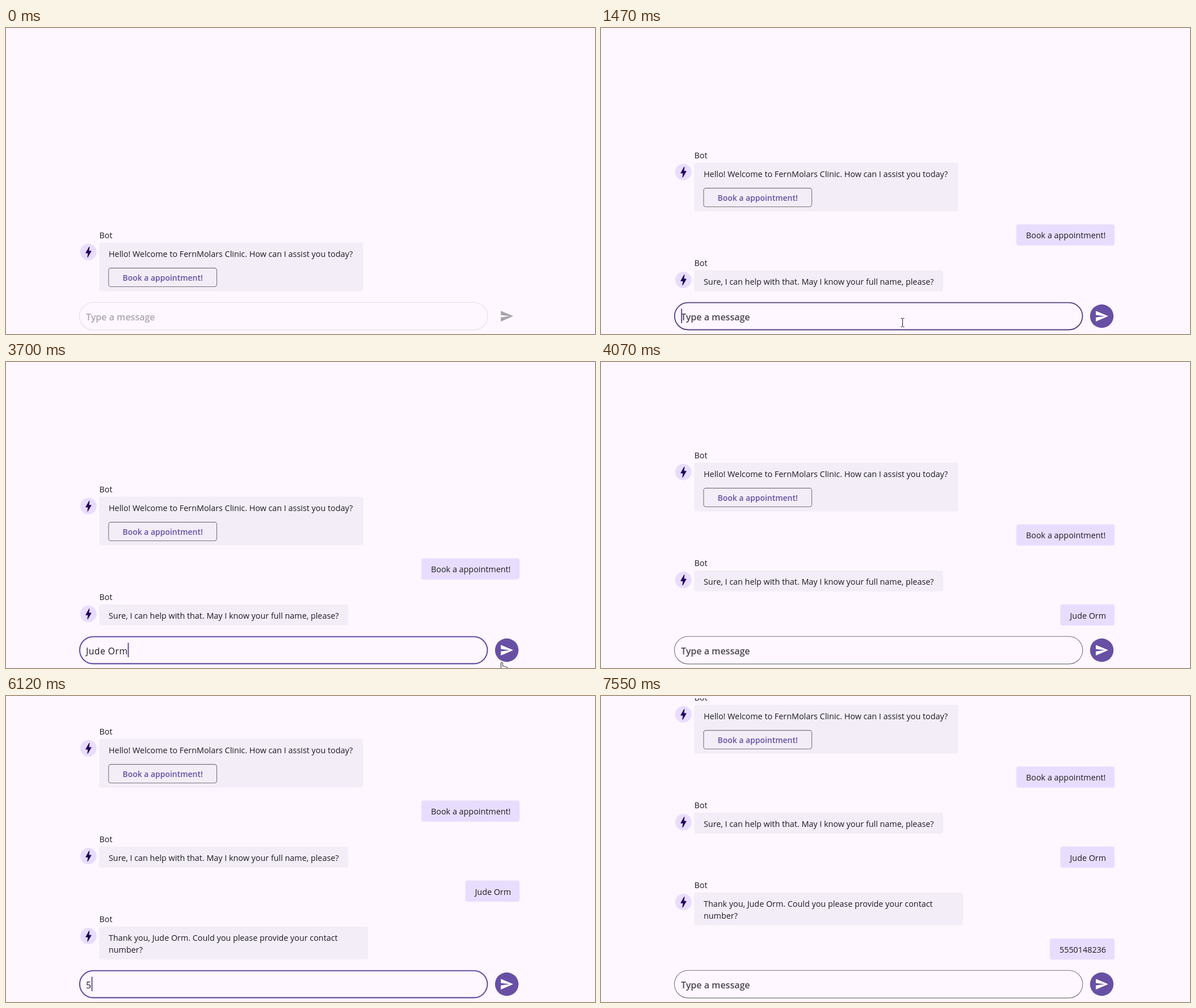
Recreate the animation shown at these times as an HTML page. Size 1038 by 540 pixels, loop 8 s.

```html
<!DOCTYPE html>
<html lang="en">
<head>
<meta charset="utf-8">
<title>Clinic chat</title>
<style>
html, body { margin: 0; height: 100%; overflow: hidden; background: #fef7ff; }
svg { display: block; width: 100vw; height: 100vh; }
text { font: 14.35px "Open Sans", "Noto Sans", sans-serif; fill: #1d1b20; white-space: pre; }
text.action { font-size: 13.95px; font-weight: 600; fill: #6750a4; }
#hint { font-size: 16px; font-weight: 600; fill: #49454f; }
#typed { font-size: 15.7px; letter-spacing: .5px; }
.bot { fill: #f2edf7; }
.user, .avatar { fill: #e8ddff; }
.bolt { fill: #21005d; }
.outline, #field { fill: none; stroke: #79747e; stroke-width: 1.1; }
#caret { fill: #6750a4; }
.cursor { fill: #fff; stroke: #1d1b20; stroke-linejoin: round; }
</style>
</head>
<body>
<svg viewBox="0 0 1038 540">
  <clipPath id="view"><rect y="4" width="1038" height="470"/></clipPath>
  <g clip-path="url(#view)"><g id="chat"></g></g>
  <rect id="field"/>
  <text id="hint" x="141" y="516">Type a message</text>
  <text id="typed" x="141" y="515.5"></text>
  <rect id="caret" y="495.5" width="2" height="25.5"/>
  <circle id="disc" cx="882.5" cy="508.5" r="20.7" fill="#6750a4"/>
  <path id="send" transform="translate(869.9 496) scale(1.045)" d="M2.01 21 23 12 2.01 3 2 10l15 2-15 2z"/>
  <path id="beam" class="cursor" style="fill:none" d="M-3-7.5h2.2l.8.8.8-.8H3M0-6.7V6.7M-3 7.5h2.2l.8-.8.8.8H3"/>
  <path id="hand" class="cursor" d="M-1.5 1Q0-1 1.5 1V7Q4 6 5 8 7 7 8 9 10 8 10 10V15L8 20H0L-4 13Q-5 10-1.5 12Z"/>
</svg>
<script>
const LOOP = 8000, NAME = "Jude Orm", PHONE = "5550148236";
const SENT_NAME = 3850, SENT_PHONE = 7360, BOOKED = 650;
const $ = id => document.getElementById(id);

// Chat history, laid out once in scroll coordinates
const BOLT = "M11 21h-1l1-7H7.5q-.8-.1-.3-.8Q9.500 9.200 13 3h1l-1 7h3.500q.8.1.4.7Q13 17.500 11 21z";
const label = (x, y, s, cls = "") => `<text x="${x}" y="${y}" class="${cls}">${s}</text>`;
const box = (cls, x, y, w, h) =>
  `<rect class="${cls}" x="${x}" y="${y}" width="${w}" height="${h}" rx="4"/>`;
const bot = (y, w, h, ...lines) =>
  label(164.5, y - 8, "Bot") + box("bot", 164, y, w, h) +
  `<circle class="avatar" cx="145.2" cy="${y + 16.8}" r="14.5"/>` +
  `<path class="bolt" transform="translate(132.8 ${y + 4.4}) scale(1.045)" d="${BOLT}"/>` +
  lines.map((s, i) => label(181, y + 25 + 21 * i, s)).join("");
const user = (y, x, s) => box("user", x, y, 905 - x, 37.3) + label(x + 17, y + 24.7, s);

$("chat").innerHTML =
  bot(378.5, 465.5, 86, "Hello! Welcome to FernMolars Clinic. How can I assist you today?") +
  box("outline", 180.8, 423.6, 190.7, 32.9) + label(205.5, 446, "Book a appointment!", "action") +
  user(487.5, 732, "Book a appointment!") +
  bot(568.7, 439, 37, "Sure, I can help with that. May I know your full name, please?") +
  user(628.8, 809.5, NAME) +
  bot(709.8, 474, 58, `Thank you, ${NAME}. Could you please provide your contact`, "number?") +
  user(791, 791, PHONE);

const scrolls = [[0, 0], [BOOKED, -141], [SENT_NAME, -201], [4990, -303], [SENT_PHONE, -363]];
const nameKeys = [2160, 2240, 2380, 2480, 2570, 2790, 2860, 2930];
const phoneKeys = [...PHONE].map((_, i) => 6120 + i * 28.8);
const blinks = [1390, 1720, 1980, 3190, 3480, SENT_NAME, 5340, 5650, 5940, 6670, 6930, SENT_PHONE];

// Border colour and width of the message field
const off = ["#e5dee7", 1.1], idle = ["#79747e", 1.1], hover = ["#1d1b20", 1.1], focus = ["#6750a4", 2.1];
const borders = [[0, off], [BOOKED, idle], [760, hover], [940, idle], [1270, hover], [1400, focus],
  [SENT_NAME, idle], [5230, hover], [5360, focus], [SENT_PHONE, idle]];

// Pointer trips: [time, x, y]
const handTrips = [
  [[370, 300, 540], [560, 282, 444], [680, 282, 444], [900, 330, 545]],
  [[3670, 872, 533], [3800, 884, 510], [3880, 884, 510], [4060, 914, 545]],
  [[7140, 870, 533], [7300, 882, 510], [7390, 882, 510], [7545, 886, 545]]];
const beamTrips = [1250, 5210].map(t =>
  [[t, 540, 545], [t + 120, 531.5, 512.5], [t + 190, 531.5, 512.5], [t + 290, 531.5, 545]]);

const passed = (times, t) => times.filter(x => x <= t).length;
const show = (el, on) => el.style.display = on ? "" : "none";

function movePointer(el, trips, t) {
  const trip = trips.find(p => t >= p[0][0] && t < p.at(-1)[0]);
  show(el, trip);
  if (!trip) return;
  const i = trip.findIndex(p => p[0] > t), [a, x, y] = trip[i - 1], [b, u, v] = trip[i];
  const k = (t - a) / (b - a), e = k * k * (3 - 2 * k);
  el.setAttribute("transform", `translate(${x + (u - x) * e} ${y + (v - y) * e})`);
}

function drawField(t) {
  const i = passed(borders.map(b => b[0]), t) - 1, [start, [color, width]] = borders[i];
  const [from, fromWidth] = borders[Math.max(0, i - 1)][1];
  const k = Math.min(1, (t - start) / 100), w = fromWidth + (width - fromWidth) * k;
  const attrs = { x: 128.8 + w / 2, y: 483.7 + w / 2, width: 720.6 - w, height: 49.7 - w, rx: 24.8 - w / 2 };
  for (const key in attrs) $("field").setAttribute(key, attrs[key]);
  $("field").style.stroke = `color-mix(in srgb, ${color} ${k * 100}%, ${from})`;
  $("field").style.strokeWidth = w;
}

function draw(t) {
  const y = scrolls.findLast(s => s[0] <= t)[1];
  $("chat").setAttribute("transform", `translate(0 ${y})`);

  const text = t < SENT_NAME ? NAME.slice(0, passed(nameKeys, t))
    : t < SENT_PHONE ? PHONE.slice(0, passed(phoneKeys, t)) : "";
  $("typed").textContent = text;
  show($("hint"), !text);
  show($("caret"), passed(blinks, t) % 2);
  $("caret").setAttribute("x", 141 + (text ? $("typed").getComputedTextLength() : 0));

  const ready = t >= BOOKED;
  $("hint").style.fill = ready ? "" : "#aba5ae";
  $("send").style.fill = ready ? "#fff" : "#a8a2aa";
  show($("disc"), ready);
  drawField(t);
  movePointer($("hand"), handTrips, t);
  movePointer($("beam"), beamTrips, t);
}

const begin = performance.now();
function tick() {
  draw((performance.now() - begin) % LOOP);
  requestAnimationFrame(tick);
}
tick();
</script>
</body>
</html>
```
